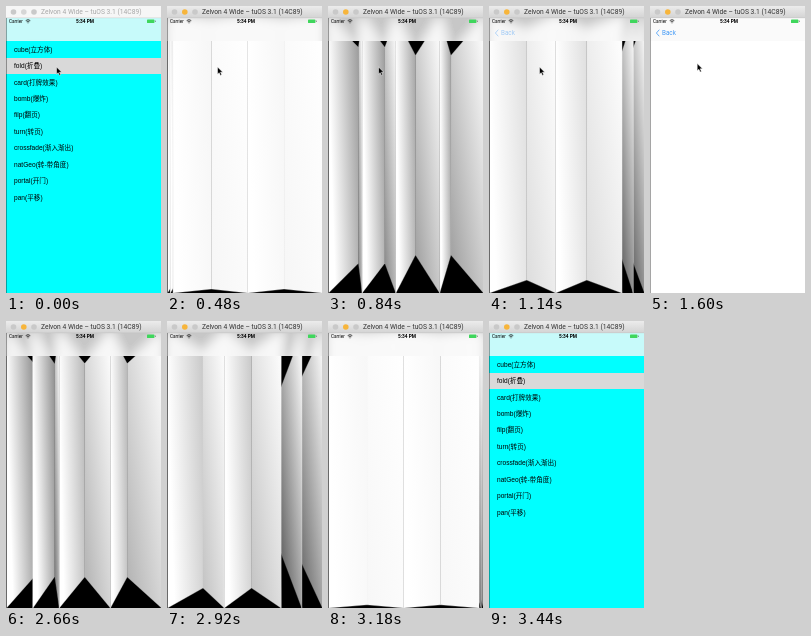
Write an HTML page that moves like this. It is 155 px wide and 287 px high and loops after 3.46 s.

```html
<!DOCTYPE html>
<html lang="en">
<head>
<meta charset="utf-8">
<style>
  html, body { margin: 0; width: 100%; height: 100%; overflow: hidden; background: #fff; }
  svg { display: block; width: 155px; height: 287px; }
  text { font-family: Roboto, "Liberation Sans", sans-serif; }
  #rows text { font: 6.6px "Liberation Sans", "Noto Sans CJK SC", "Noto Sans CJK", sans-serif; }
</style>
</head>
<body>
<svg viewBox="0 0 155 287" xmlns="http://www.w3.org/2000/svg">
  <defs id="defs">
    <linearGradient id="chrome" x2="0" y2="1">
      <stop stop-color="#ececec"/>
      <stop offset="1" stop-color="#d3d3d3"/>
    </linearGradient>
    <clipPath id="screen"><rect y="11.5" width="155" height="275.5"/></clipPath>
    <clipPath id="bar"><rect y="11.5" width="155" height="23.5"/></clipPath>
    <filter id="blur" filterUnits="userSpaceOnUse" x="-10" y="0" width="175" height="70">
      <feGaussianBlur stdDeviation="4"/>
    </filter>
  </defs>

  <g clip-path="url(#screen)">
    <g id="view">
      <rect id="back" x="-20" y="-10" width="195" height="317"/>
      <g id="folds"></g>
      <g id="rows"><rect y="52" width="155" height="16" fill="#d9d9d9"/></g>
    </g>
  </g>

  <g clip-path="url(#bar)">
    <rect y="11" width="155" height="24" fill="#fff"/>
    <use href="#view" filter="url(#blur)"/>
    <rect y="11" width="155" height="24" fill="#f9f9f9" opacity=".8"/>
  </g>
  <g id="backItem" fill="#1683f5" opacity="0">
    <path d="M9.3 23.7 6.4 27l2.9 3.3" fill="none" stroke="#1683f5" stroke-width=".8"/>
    <text x="12" y="29.3" font-size="6.3">Back</text>
  </g>

  <text x="3" y="17.2" font-size="4.6">Carrier</text>
  <g fill="none" stroke="#000" stroke-width=".7">
    <path d="M19.7 14.6q2.3-2 4.6 0M20.6 15.7q1.4-1.2 2.8 0"/>
    <path d="M21.5 16.8h1"/>
  </g>
  <text x="79" y="17.3" font-size="4.8" font-weight="700" text-anchor="middle">5:34 PM</text>
  <rect x="141" y="13.5" width="7.4" height="3.6" rx=".7" fill="#3fd65c"/>
  <path d="M149.4 14.6v1.4" stroke="#555" stroke-width=".6"/>

  <rect id="title" width="155" height="12"/>
  <path d="M0 11.8h155" stroke="#bbb" stroke-width=".4"/>
  <circle cx="7.5" cy="6" r="2.8" fill="#c9c9c9"/>
  <circle id="amber" cx="17.8" cy="6" r="2.8"/>
  <circle cx="28" cy="6" r="2.8" fill="#c9c9c9"/>
  <text id="caption" x="35" y="8.4" font-size="6.7">Zelvon 4 Wide – tuOS 3.1 (14C89)</text>
  <path d="M.5 12v275" stroke="#000" opacity=".35"/>

  <path id="cursor" d="M0 0v7.2l1.7-1.5 1.2 2.7 1.3-.6-1.2-2.6h2.3z" fill="#000" stroke="#fff" stroke-width=".5"/>
</svg>

<script>
const LOOP = 3460, FOLD_TIME = 1100, CLICK = 240, PUSH = 332, POP = 2214;
const LEFT = 0.5, WIDTH = 155, CX = LEFT + WIDTH / 2;
const TOP = 11.5, HEIGHT = 275.5, CY = TOP + HEIGHT / 2;
const FOLD = WIDTH / 4;      // width of one panel on stage
const FOLD_PT = 103.5;       // the same width in device points
const EYE = 0.005;           // perspective strength per point
// shadow line from the hinge (height y) to the crease (height y + dy), as fractions
const LEFT_SHADOW = { y: 0.2, dy: -0.2 }, RIGHT_SHADOW = { y: 0, dy: 1 };
const $ = id => document.getElementById(id);
const clamp = v => Math.max(0, Math.min(1, v));
const mix = (a, b, k) => a + (b - a) * k;

function make(tag, parent, attrs) {
  const el = document.createElementNS('http://www.w3.org/2000/svg', tag);
  return parent.appendChild(set(el, attrs));
}
function set(el, attrs) {
  for (const key in attrs) el.setAttribute(key, attrs[key]);
  return el;
}

['cube(立方体)', 'fold(折叠)', 'card(打牌效果)', 'bomb(爆炸)', 'filp(翻页)', 'turn(转页)',
 'crossfade(渐入渐出)', 'natGeo(转-带角度)', 'portal(开门)', 'pan(平移)'].forEach((label, i) => {
  make('text', $('rows'), { x: 8, y: 45.8 + i * 16.42 }).textContent = label;
});

const panels = Array.from({ length: 8 }, (_, i) => {
  const grad = make('linearGradient', $('defs'), { id: 'shade' + i, gradientUnits: 'userSpaceOnUse' });
  make('stop', grad, { 'stop-color': '#fff' });
  const dark = make('stop', grad, { offset: 1 });
  const paint = `url(#shade${i})`;
  const shape = make('polygon', $('folds'), { fill: paint, stroke: paint, 'stroke-width': 0.3 });
  return { grad, dark, shape };
});

// cubic-bezier(.42, 0, .58, 1)
function easeInOut(t) {
  let lo = 0, hi = 1;
  for (let i = 0; i < 24; i++) {
    const u = (lo + hi) / 2, v = 1 - u;
    if (3 * v * v * u * 0.42 + 3 * v * u * u * 0.58 + u * u * u < t) lo = u; else hi = u;
  }
  return lo * lo * (3 - 2 * lo);
}

// Two panels hinged at a and b that meet in a crease behind the screen.
function foldPair(a, b, angle, extra, shade) {
  const half = (b - a) / 2, depth = FOLD_PT * Math.sin(angle);
  const s = Math.min(1, half / (FOLD * Math.cos(angle) - half * depth * EYE * extra));
  const local = 1 + s * depth * EYE * extra;
  const w = 1 + s * depth / local * EYE;
  const crease = { x: CX + (a + half - CX) / w, h: HEIGHT / 2 / (w * local), s, shade };
  return [
    { ...crease, hinge: a, shadow: LEFT_SHADOW, far: Math.abs(a + half / 2 - CX) },
    { ...crease, hinge: b, shadow: RIGHT_SHADOW, far: Math.abs(b - half / 2 - CX) }
  ];
}

function drawPanel({ grad, dark, shape }, f) {
  const dx = f.x - f.hinge || 0.01, { y, dy } = f.shadow;
  set(shape, { points: [f.hinge, TOP, f.x, CY - f.h, f.x, CY + f.h, f.hinge, TOP + HEIGHT].join(' ') });
  const scale = 1 + dy * dy;
  const gx = f.s / dx / scale, gy = dy / HEIGHT / scale, n = gx * gx + gy * gy;
  const y1 = TOP + y * HEIGHT;
  set(grad, { x1: f.hinge, y1, x2: f.hinge + gx / n, y2: y1 + gy / n });
  const grey = Math.round(255 * (1 - f.shade));
  set(dark, { 'stop-color': `rgb(${grey},${grey},${grey})` });
}

function drawFolds(t) {
  const p = Math.max(0.002, Math.min(0.998, easeInOut(t)));
  const edge = LEFT + WIDTH * p, right = LEFT + WIDTH, quarter = Math.PI / 2;
  const inMid = (LEFT + edge) / 2, outMid = (edge + right) / 2;
  const faces = [
    ...foldPair(LEFT, inMid, quarter * (1 - p), 0, 1 - p),
    ...foldPair(inMid, edge, quarter * (1 - p), 0, 1 - p),
    ...foldPair(edge, outMid, quarter * p, p, p),
    ...foldPair(outMid, right, quarter * p, p, p)
  ].sort((a, b) => b.far - a.far);
  faces.forEach((f, i) => drawPanel(panels[i], f));
}

function drawCursor(ms) {
  const go = easeInOut(clamp((ms - 1480) / 560)), leave = clamp((ms - 2270) / 240);
  const x = mix(mix(50.5, 15.5, go), -10, leave * leave);
  const y = mix(mix(61, 25, go), 20, leave * leave);
  set($('cursor'), { transform: `translate(${x} ${y})`, display: leave < 1 ? 'inline' : 'none' });
}

// The window is inactive until the first click.
function drawTitle(active) {
  set($('title'), { fill: active ? 'url(#chrome)' : '#f6f6f6' });
  set($('amber'), { fill: active ? '#f7b53b' : '#d6d6d6' });
  set($('caption'), { fill: active ? '#333' : '#a8a8a8' });
}

function render(ms) {
  const push = (ms - PUSH) / FOLD_TIME, pop = (ms - POP) / FOLD_TIME;
  const t = pop >= 0 ? pop : push;
  const folding = t >= 0 && t < 1;
  const list = push < 0 || pop >= 1;
  set($('back'), { fill: folding ? '#000' : list ? '#0ff' : '#fff' });
  set($('folds'), { display: folding ? 'inline' : 'none' });
  set($('rows'), { display: list ? 'inline' : 'none' });
  if (folding) drawFolds(t);
  const shown = pop >= 0 ? 1 - pop / 0.35 : (push - 0.5) * 2;
  set($('backItem'), { opacity: clamp(shown) * 0.8 });
  drawTitle(ms >= CLICK);
  drawCursor(ms);
}

let start;
function tick(now) {
  if (start === undefined) start = now;
  render((now - start) % LOOP);
  requestAnimationFrame(tick);
}
render(0);
requestAnimationFrame(tick);
</script>
</body>
</html>
```
